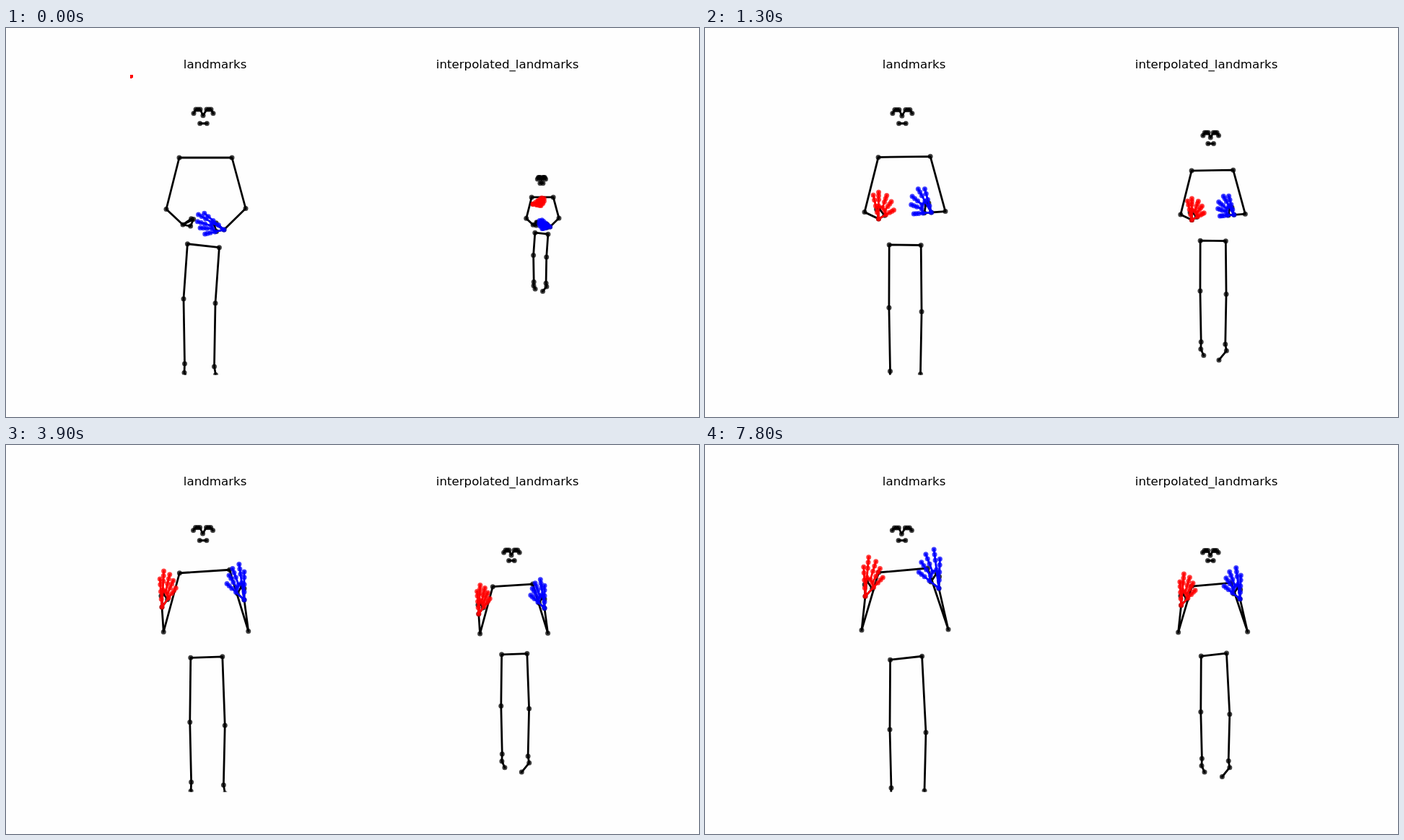
Recreate the animation shown at these times as an HTML page. Size 960 by 540 pixels, loop 8 s.

```html
<!DOCTYPE html>
<html lang="en">
<head>
<meta charset="utf-8">
<title>Landmarks</title>
<style>
  html, body { margin: 0; width: 100%; height: 100%; overflow: hidden; background: #fefefe; }
  svg { display: block; width: 960px; height: 540px; }
  text { font: 16.667px "DejaVu Sans", sans-serif; text-anchor: middle; }
  path { fill: none; stroke-width: 2.78; stroke-linecap: square; stroke-linejoin: round; }
  circle { opacity: .75; }
</style>
</head>
<body>
<svg viewBox="0 0 960 540">
  <clipPath id="axes"><rect x="172" y="65" width="236" height="416.5"/></clipPath>
  <text x="289.6" y="56">landmarks</text>
  <text x="694.6" y="56">interpolated_landmarks</text>
  <g id="raw" clip-path="url(#axes)"></g>
  <g id="smooth"></g>
</svg>
<script>
const LOOP = 8000;

// Key poses. red and blue: wrist x, wrist y, turn of the hand in degrees.
const KEYS = [
  { step: 0,  sway: -9, bob: -11, red: [245, 273, 55],  blue: [302, 280, 50], spread: 1,    reach: .75 },
  { step: 7,  sway: 4,  bob: 0,   red: [247, 283, -13], blue: [310, 271, 28], spread: 1.4,  reach: .73 },
  { step: 9,  sway: -3, bob: -1,  red: [234, 247, -12], blue: [317, 241, 3],  spread: 1.75, reach: .62 },
  { step: 12, sway: 2,  bob: -9,  red: [216, 225, -4],  blue: [330, 215, 0],  spread: .87,  reach: .91 },
  { step: 14, sway: 2,  bob: 0,   red: [213, 215, -3],  blue: [331, 206, 1],  spread: .9,   reach: 1 },
  { step: 16, sway: 2,  bob: 5,   red: [215, 212, -3],  blue: [330, 203, 1],  spread: .9,   reach: 1 },
  { step: 18, sway: 4,  bob: -1,  red: [222, 210, -3],  blue: [324, 199, -2], spread: 1,    reach: .99 },
];
// Thumb to little finger.
const FINGER_ANGLES = [0, 8, 20, 31, 46];
const FINGER_LENGTHS = [41, 55, 51, 44, 36];

const clamp = v => Math.min(1, Math.max(0, v));
const mix = (a, b, k) => Array.isArray(a) ? a.map((v, i) => mix(v, b[i], k)) : a + (b - a) * k;
const shift = ([x, y], dx, dy) => [x + dx, y + dy];
const pair = (cx, cy, half, tilt) => [[cx - half, cy - tilt / 2], [cx + half, cy + tilt / 2]];

// Ten steps per 100 ms at first, then alternating holds of 600 and 700 ms.
function stepAt(t) {
  return t < 700 ? Math.floor(t / 100) : 7 + Math.floor((t - 700 + 50) / 650);
}

function poseAt(step) {
  const next = Math.max(1, KEYS.findIndex(key => key.step >= step));
  const a = KEYS[next - 1], b = KEYS[next];
  const k = (step - a.step) / (b.step - a.step);
  return Object.fromEntries(Object.keys(a).map(name => [name, mix(a[name], b[name], k)]));
}

function faceChains(lift) {
  const cx = 273.5 - .6 * lift;
  const brow = side => [0, 1, 2, 3].map(i =>
    [cx + side * (4.5 + 3 * i), i < 3 ? 113 + 2 * lift : 118.5]);
  return [[...brow(-1).reverse(), [cx - .5, 121.5 + 2 * lift], ...brow(1)],
          pair(cx, 132.5, 4.8, 0)];
}

function bodyChains({ step, sway, bob, red, blue }, lift, hands) {
  const shoulders = pair(276.5 - 2 * lift, 180 - 6 * lift, 36.5 - 2.5 * lift, -6 * lift);
  const elbows = pair(277, 251 + 5.5 * lift + 20 * lift * (1 - lift), 55 + 5 * lift, -1);
  const hips = pair(277 + .4 * sway, 305.5 - 9.5 * Math.sqrt(lift) + .3 * bob, 22, 5 - .55 * step);
  const knees = pair(277 + sway, 390 + 8 * lift + bob, 22 + 3 * lift, 6 - 2 * lift);
  const ankles = pair(277 + sway, 479 + bob, 20.5 + 2.5 * lift, 4);
  const heels = [shift(ankles[0], -.5, 12.5), shift(ankles[1], 2, 11.5)];
  const toes = [shift(heels[0], 5, 11), shift(heels[1], -13, 16)];
  const leg = side => [hips, knees, ankles, heels, toes].map(joint => joint[side]);
  const palms = hands.map(({ wrist, tips }) => {
    const [thumb, index, , , little] = tips.map(tip => mix(wrist, tip, .4));
    return [wrist, little, index, wrist, thumb];
  });
  return [[hands[0].wrist, elbows[0], ...shoulders, elbows[1], hands[1].wrist],
          [...leg(0).reverse(), ...leg(1)], ...palms];
}

function makeHand([x, y, turn], side, spread, reach) {
  const tips = FINGER_LENGTHS.map((length, i) => {
    const angle = (turn + spread * FINGER_ANGLES[i]) * Math.PI / 180;
    const r = length * (i ? reach : Math.sqrt(reach));
    return [x + side * r * Math.sin(angle), y - r * Math.cos(angle)];
  });
  return { wrist: [x, y], tips };
}

function handChains({ wrist, tips }) {
  const fingers = tips.map((tip, i) =>
    (i ? [.48, .72, .87, 1] : [.28, .55, .8, 1]).map(k => mix(wrist, tip, k)));
  const knuckles = fingers.slice(1).map(finger => finger[0]);
  return [[wrist, ...fingers[0]], ...fingers.slice(1), [wrist, ...knuckles, wrist]];
}

function graph(chains, color, { scale, offset }) {
  const place = ([x, y]) => [x * scale + offset[0], y * scale + offset[1]];
  const lines = chains.map(chain => "M" + chain.map(place).join("L")).join("");
  const dots = [...new Set(chains.flat())].map(place);
  return `<path d="${lines}" stroke="${color}"/>` +
    dots.map(([x, y]) => `<circle cx="${x}" cy="${y}" r="3.5" fill="${color}"/>`).join("");
}

function figure(step, view, redChains) {
  const pose = poseAt(step);
  const lift = 1 - (1 - clamp((step - 7) / 10)) ** 2;
  const red = makeHand(pose.red, 1, pose.spread, pose.reach);
  const blue = makeHand(pose.blue, -1, pose.spread + .15, pose.reach);
  return graph([...faceChains(lift), ...bodyChains(pose, lift, [red, blue])], "#000", view) +
    graph(redChains(handChains(red)), "#f00", view) +
    graph(handChains(blue), "#00f", view);
}

const raw = document.getElementById("raw");
const smooth = document.getElementById("smooth");
let shown = -1;

function draw() {
  const step = stepAt(performance.now() % LOOP);
  if (step !== shown) {
    const grow = clamp(step / 3);
    const view = { scale: mix(.411, .8, grow), offset: mix([629.5, 161], [482, 54.5], grow) };
    // On the first step the red hand is undetected: at the raw origin, guessed high when smoothed.
    const atOrigin = chains => chains.map(chain => chain.map(() => [172.5, 66]));
    const guessed = chains => chains.map(chain => chain.map(point => shift(point, 0, -70)));
    const detected = chains => chains;
    raw.innerHTML = figure(step, { scale: 1, offset: [0, 0] }, step ? detected : atOrigin);
    smooth.innerHTML = figure(step, view, step ? detected : guessed);
    shown = step;
  }
  requestAnimationFrame(draw);
}
draw();
</script>
</body>
</html>
```
